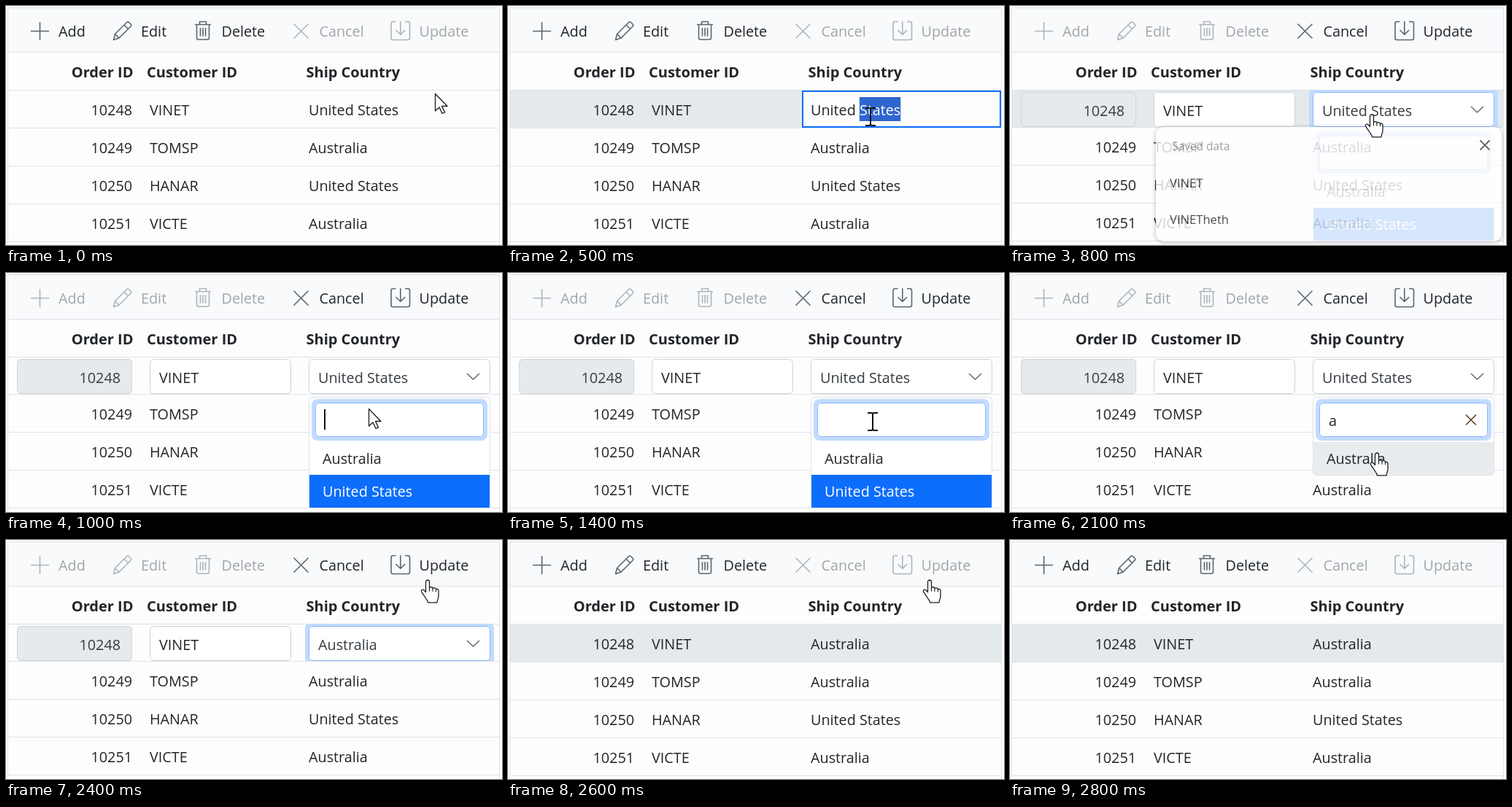
Animation, 680 px wide and 328 px high, one loop 3100 ms. Source, as an HTML page with a canvas:

```html
<!DOCTYPE html>
<html lang="en">
<head>
<meta charset="utf-8">
<title>Grid editing</title>
<style>
html, body { margin: 0; width: 100%; height: 100%; overflow: hidden; background: #fdfdfd; }
canvas { display: block; }
</style>
</head>
<body>
<canvas id="stage" width="680" height="328"></canvas>
<script>
const stage = document.getElementById('stage').getContext('2d');
const layer = document.createElement('canvas').getContext('2d');
layer.canvas.width = 680;
layer.canvas.height = 328;
let ctx = stage;

const LOOP = 3100, STEP = 100;
const FAMILY = '"Open Sans", "Noto Sans", sans-serif';
const INK = '#212529', LINE = '#dee2e6', BLUE = '#0d6efd', PAPER = '#fdfdfd';
const SELECTED = '#e4e9ec', EDGE = '#ced4da', RING = '#c2dbfe', FOCUS = '#86b7fe';

const ROWS = [
  ['10248', 'VINET', 'United States'],
  ['10249', 'TOMSP', 'Australia'],
  ['10250', 'HANAR', 'United States'],
  ['10251', 'VICTE', 'Australia']
];

const ICONS = {
  add: new Path2D('M34 34.5h25M46.5 22v25'),
  edit: new Path2D('M147.5 46.5l2-8 16-16q1.5-1.5 3 0l2.5 2.5q1.5 1.5 0 3l-16 16zM149.5 38.5l5.5 5.5M162 26l5.5 5.5'),
  del: new Path2D('M259 25.5h22M265.5 25v-3.5h9v3.5M261.5 25.5v18q0 2.5 2.5 2.5h12q2.5 0 2.5-2.5v-18M266.5 30v11.5M270 30v11.5M273.5 30v11.5'),
  cancel: new Path2D('M394.5 24.5l20 20M414.5 24.5l-20 20'),
  update: new Path2D('M534.5 21.5h-4q-2.5 0-2.5 2.5v20q0 2.5 2.5 2.5h20.5q2.5 0 2.5-2.5v-20q0-2.5-2.5-2.5h-4M540.8 21v18M534.5 33l6.3 6.3 6.3-6.3')
};

const BUTTONS = [
  ['add', 'Add', 72, false], ['edit', 'Edit', 185, false], ['del', 'Delete', 295.5, false],
  ['cancel', 'Cancel', 429.5, true], ['update', 'Update', 566.5, true]
];

const ARROW = new Path2D('M.5.5v23.5l5.5-5 4 8.5 3.5-1.6-4-8.4h7.5z');
const HAND = new Path2D('M-2.5 2.5a2.5 2.5 0 0 1 5 0v8.5c0-2 4.5-2 4.5 .8 0-2 4.5-1.5 4.5 1 1-1.5 3.5-.5 3.5 2v7c0 4-2 5-2 9h-12.500c0-3-3-5-5-9l-4-6c-1-2 1.5-3.500 3.500-2l2.500 2.700z');
const KNUCKLES = new Path2D('M2.5 11v4.500M7 11.800v4M11.500 12.800v3.500');
const BEAM = new Path2D('M-7-12h5q2 0 2 2 0-2 2-2h5M0-10v20M-7 12h5q2 0 2-2 0 2 2 2h5');

// start time, shape, x, y
const POINTER = [
  [0, 'arrow', 588, 120], [100, 'arrow', 543, 136], [200, 'arrow', 497, 151],
  [300, 'beam', 497, 152], [700, 'hand', 496, 149], [900, 'hand', 496, 160],
  [1000, 'arrow', 497, 186], [1100, 'beam', 499, 198], [1200, 'beam', 500, 204],
  [1800, 'beam', 500, 212], [1900, 'hand', 502, 236], [2000, 'hand', 503, 247],
  [2300, 'arrow', 502, 193], [2400, 'hand', 578, 55], [2700, 'arrow', 580, 58],
  [2800, 'none', 0, 0]
];

function text(str, x, y, { color = INK, size = 19.8, weight = 400, align = 'left' } = {}) {
  ctx.font = `${weight} ${size}px ${FAMILY}`;
  ctx.fillStyle = color;
  ctx.textAlign = align;
  ctx.fillText(str, x, y);
}

function fill(x, y, w, h, color) {
  ctx.fillStyle = color;
  ctx.fillRect(x, y, w, h);
}

function box(x, y, w, h, r, color, edge) {
  ctx.beginPath();
  ctx.roundRect(x, y, w, h, r);
  ctx.fillStyle = color;
  ctx.fill();
  if (!edge) return;
  ctx.beginPath();
  ctx.roundRect(x + .5, y + .5, w - 1, h - 1, r);
  ctx.strokeStyle = edge;
  ctx.lineWidth = 1;
  ctx.stroke();
}

function stroke(path, color, width) {
  ctx.strokeStyle = color;
  ctx.lineWidth = width;
  ctx.lineJoin = 'round';
  ctx.stroke(path);
}

function cross(x, y, r, color, width = 1.6) {
  stroke(new Path2D(`M${x - r} ${y - r}l${2 * r} ${2 * r}M${x + r} ${y - r}l${-2 * r} ${2 * r}`), color, width);
}

function field(x, y, w, h, { color = '#fff', focus = false } = {}) {
  if (focus) box(x - 5, y - 5, w + 10, h + 10, 8, RING);
  box(x, y, w, h, 5, color, focus ? FOCUS : EDGE);
}

// Paints a group on its own layer so that its parts fade as one.
function faded(alpha, draw) {
  layer.clearRect(0, 0, 680, 328);
  ctx = layer;
  draw();
  ctx = stage;
  ctx.globalAlpha = alpha;
  ctx.drawImage(layer.canvas, 0, 0);
  ctx.globalAlpha = 1;
}

function toolbar(editing, pressed) {
  fill(3, 3, 673, 60, '#f8fafb');
  if (pressed) box(517, 9, 127, 49, 5, '#e9ecef');
  for (const [icon, label, x, forEdit] of BUTTONS) {
    const on = forEdit === editing;
    stroke(ICONS[icon], on ? '#5c656d' : '#b0b4b8', 1.6);
    text(label, x, 42, { color: on ? INK : '#a3a6a9' });
  }
}

function grid(t, editing) {
  const shift = editing ? 1 : 0;
  const saved = t >= 2600;
  const marked = (t >= 400 && t < 900) || saved;
  if (marked) fill(3, 116, 673, 51 - shift, SELECTED);
  fill(2, 63, 675, 1, LINE);
  fill(2, 115, 675, 1, LINE);
  const head = { weight: 700, size: 20 };
  text('Order ID', 174.5, 98, { ...head, align: 'right' });
  text('Customer ID', 193, 98, head);
  text('Ship Country', 411.5, 98, head);
  ROWS.forEach(([id, customer, country], i) => {
    const y = 150 + 52 * i - shift;
    fill(2, y + 17, 675, 1, LINE);
    if (editing && i === 0) return;
    if (i === 0 && t >= 400 && t < 700) cellFocus();
    text(id, 173, y, { align: 'right' });
    text(customer, 197, y);
    text(i === 0 && saved ? 'Australia' : country, 415, y);
  });
  if (t >= 500 && t < 700) selectWord();
}

function cellFocus() {
  fill(403, 116, 273, 51, BLUE);
  fill(405, 118, 269, 47, PAPER);
}

function selectWord() {
  const x = 415 + ctx.measureText('United ').width;
  fill(x, 125, ctx.measureText('States').width, 33, '#2f65cf');
  text('States', x, 150, { color: '#fff' });
}

function form(t) {
  const focus = (t >= 800 && t < 900) || t >= 2300;
  ctx.save();
  ctx.beginPath();
  ctx.rect(3, 115, 673, 51);
  ctx.clip();
  field(15, 118, 158, 48, { color: '#e6eaed' });
  text('10248', 157, 151, { color: '#363c42', align: 'right' });
  field(197, 118, 194, 48);
  text('VINET', 210, 151);
  field(415, 118, 249, 48, { focus });
  text(t >= 2300 ? 'Australia' : 'United States', 428, 151, { color: '#363c42' });
  stroke(new Path2D('M632 138l8.5 8 8.5-8'), '#60686f', 1.5);
  ctx.restore();
}

function savedData() {
  ctx.save();
  ctx.shadowColor = 'rgba(0,0,0,.35)';
  ctx.shadowBlur = 6;
  ctx.shadowOffsetY = 1;
  box(200, 166, 474, 157, 10, '#fff');
  ctx.restore();
  text('Saved data', 222, 198, { color: '#85898d', size: 15.5 });
  text('VINET', 219, 249, { size: 16.6, weight: 500 });
  text('VINETheth', 219, 299, { size: 16.6, weight: 500 });
  cross(651, 191, 6.5, '#222', 1.8);
}

function dropdown(typed, caret) {
  box(415, 170, 249, typed ? 108 : 153, 4, '#fff', LINE);
  field(424, 178, 231, 47, { focus: true });
  if (typed) {
    text('a', 437, 210);
    cross(632, 201.5, 7, '#5e4024');
    fill(416, 232, 247, 45, '#e9ecef');
  } else {
    fill(416, 277, 247, 45, BLUE);
    text('United States', 434, 307, { color: '#fff' });
  }
  text('Australia', 434, 262);
  if (caret) fill(typed ? 446 : 436, 187, 2, 28, '#111');
}

function pointer(t) {
  const [, kind, x, y] = POINTER.findLast(p => p[0] <= t);
  if (kind === 'none') return;
  ctx.save();
  ctx.translate(x, y);
  if (kind === 'beam') {
    stroke(BEAM, '#111', 2);
  } else {
    const shape = kind === 'hand' ? HAND : ARROW;
    ctx.fillStyle = '#fff';
    ctx.fill(shape);
    stroke(shape, '#1c1c24', 1.3);
    if (kind === 'hand') stroke(KNUCKLES, '#1c1c24', 1.1);
  }
  ctx.restore();
}

function overlays(t) {
  if (t >= 700 && t < 900) faded(t < 800 ? 1 : .8, savedData);
  if (t < 800 || t >= 2300) return;
  const caret = (t >= 1000 && t < 1400) || (t >= 1700 && t < 2100);
  faded(t < 900 ? .16 : 1, () => dropdown(t >= 1700, caret));
}

function render(now) {
  const t = Math.floor((now % LOOP) / STEP) * STEP;
  const editing = t >= 700 && t < 2600;
  fill(0, 0, 680, 328, '#fff');
  fill(2, 2, 675, 326, LINE);
  fill(3, 3, 673, 325, PAPER);
  toolbar(editing, t === 2500);
  grid(t, editing);
  if (editing) form(t);
  overlays(t);
  pointer(t);
}

let start;
function loop(now) {
  start ??= now;
  render(now - start);
  requestAnimationFrame(loop);
}
render(0);
requestAnimationFrame(loop);
</script>
</body>
</html>
```
